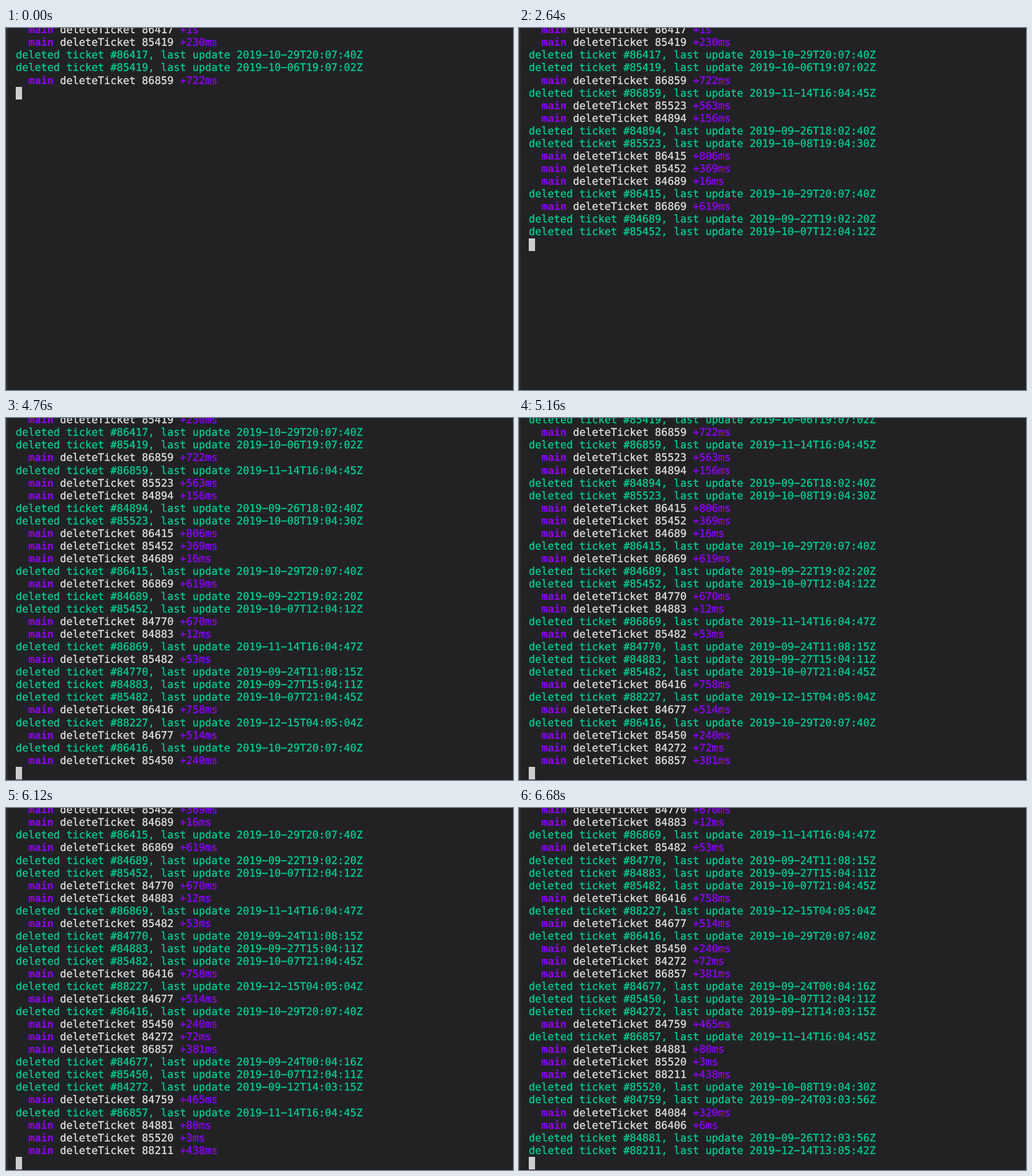
An HTML page that plays this animation: 885 by 633 pixels, repeating every 6.8 s.

```html
<!DOCTYPE html>
<html lang="en">
<head>
<meta charset="utf-8">
<title>Ticket deletion log</title>
<style>
  html, body { margin: 0; width: 100%; height: 100%; overflow: hidden; background: #222224; }
  #terminal {
    position: relative; width: 885px; height: 633px; overflow: hidden;
    font: 18.31px/22.05px "DejaVu Sans Mono", monospace;
    text-rendering: geometricPrecision;
    white-space: pre; color: #dcdcdc;
  }
  #terminal::before {
    content: ""; position: absolute; left: 1px; top: 0; width: 1px; height: 100%;
    background: #434345;
  }
  .line { position: absolute; left: 17px; margin-top: 0.6px; -webkit-text-stroke: 0.4px; }
  .deleted { color: #00cb8d; }
  .line b, .line i { color: #9000ff; font-style: normal; }
  .line b { -webkit-text-stroke: 0; }
  #cursor { position: absolute; left: 17px; width: 11px; height: 22.05px; background: #d0cdd0; }
</style>
</head>
<body>
<div id="terminal"><div id="cursor"></div></div>
<script>
const LOOP = 6800, PITCH = 22.05, FIRST_TOP = -7.25, LAST_ROW = 28;

// Each entry: time in ms, ticket, then either the delay or the last update.
const log = `
0 86417 +1s
0 85419 +230ms
0 86417 2019-10-29T20:07:40Z
0 85419 2019-10-06T19:07:02Z
0 86859 +722ms
400 86859 2019-11-14T16:04:45Z
440 85523 +563ms
600 84894 +156ms
1080 84894 2019-09-26T18:02:40Z
1120 85523 2019-10-08T19:04:30Z
1400 86415 +806ms
1760 85452 +369ms
1800 84689 +16ms
1880 86415 2019-10-29T20:07:40Z
2400 86869 +619ms
2400 84689 2019-09-22T19:02:20Z
2640 85452 2019-10-07T12:04:12Z
3040 84770 +670ms
3040 84883 +12ms
3080 86869 2019-11-14T16:04:47Z
3120 85482 +53ms
3560 84770 2019-09-24T11:08:15Z
3560 84883 2019-09-27T15:04:11Z
3600 85482 2019-10-07T21:04:45Z
3880 86416 +758ms
4040 88227 2019-12-15T04:05:04Z
4400 84677 +514ms
4400 86416 2019-10-29T20:07:40Z
4760 85450 +240ms
4960 84272 +72ms
5160 86857 +381ms
5280 84677 2019-09-24T00:04:16Z
5360 85450 2019-10-07T12:04:11Z
5360 84272 2019-09-12T14:03:15Z
5520 84759 +465ms
5640 86857 2019-11-14T16:04:45Z
5760 84881 +80ms
5760 85520 +3ms
6120 88211 +438ms
6280 85520 2019-10-08T19:04:30Z
6280 84759 2019-09-24T03:03:56Z
6480 84084 +320ms
6480 86406 +6ms
6560 84881 2019-09-26T12:03:56Z
6680 88211 2019-12-14T13:05:42Z`;

const terminal = document.getElementById('terminal');
const cursor = document.getElementById('cursor');

// The minus sign gives the wide hyphen of the terminal face.
const wideHyphens = text => text.replaceAll('-', '\u2212');

const lines = log.trim().split('\n').map(entry => {
  const [time, ticket, detail] = entry.split(' ');
  const node = document.createElement('div');
  const started = detail.startsWith('+');
  node.className = started ? 'line' : 'line deleted';
  node.innerHTML = started
    ? `  <b>main</b> deleteTicket ${ticket} <i>${detail}</i>`
    : `deleted ticket #${ticket}, last update ${wideHyphens(detail)}`;
  terminal.append(node);
  return { time: Number(time), node };
});

const place = (node, row) => { node.style.top = `${FIRST_TOP + row * PITCH}px`; };

let shown = -1;
function render(time) {
  const count = lines.filter(line => line.time <= time).length;
  if (count === shown) return;
  shown = count;
  const scroll = Math.max(0, count - LAST_ROW);
  lines.forEach(({ node }, i) => {
    node.style.display = i >= scroll && i < count ? '' : 'none';
    place(node, i - scroll);
  });
  place(cursor, count - scroll);
}

const start = performance.now();
function tick() {
  render((performance.now() - start) % LOOP);
  requestAnimationFrame(tick);
}
tick();
</script>
</body>
</html>
```
